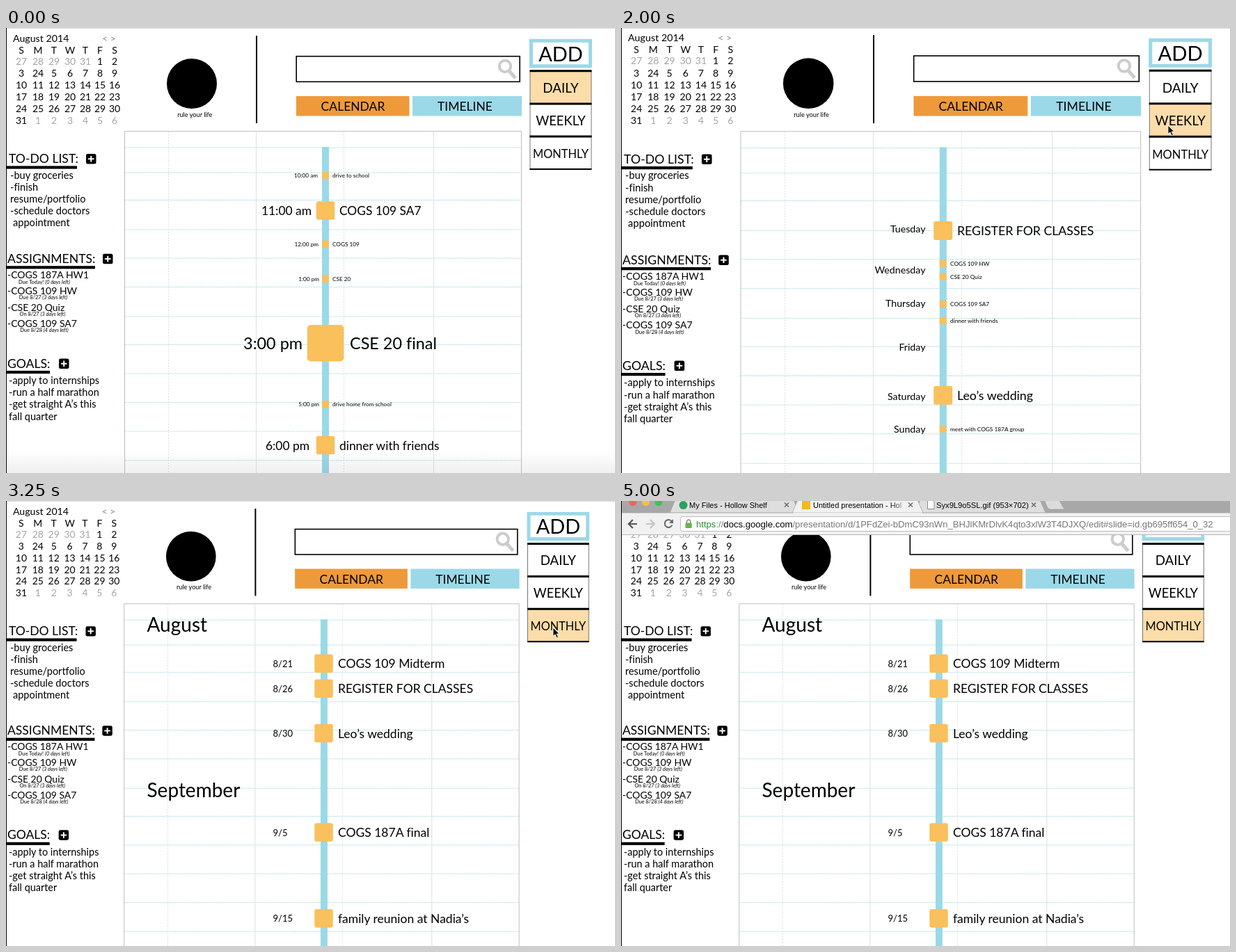
Write an HTML page that moves like this. It is 875 px wide and 640 px high and loops after 5500 ms.

```html
<!DOCTYPE html>
<html lang="en">
<head>
<meta charset="utf-8">
<title>Planner</title>
<style>
  html, body { margin: 0; width: 100%; height: 100%; overflow: hidden; background: #fff; }
  svg { display: block; width: 875px; height: 640px; font-family: Lato, sans-serif; font-variant-ligatures: none; }
  text { white-space: pre; }
  .ui { font-family: "Liberation Sans", Arial, sans-serif; }
  .anim { animation: 5500ms step-end infinite; }
  #daily { animation-name: daily; }
  #weekly { animation-name: weekly; }
  #monthly { animation-name: monthly; }
  #browser { animation-name: browser; }
  #inactive { animation-name: inactive; }
  #shade { animation-name: shade; }
  #cursor { animation-name: cursor; }
  @keyframes daily { 0% { visibility: visible } 36.36%, 100% { visibility: hidden } }
  @keyframes weekly { 0%, 59.09%, 100% { visibility: hidden } 36.36% { visibility: visible } }
  @keyframes monthly { 0% { visibility: hidden } 59.09%, 100% { visibility: visible } }
  @keyframes browser { 0% { visibility: hidden } 81.81%, 100% { visibility: visible } }
  @keyframes inactive { 0%, 90.9%, 100% { visibility: hidden } 81.81% { visibility: visible } }
  @keyframes shade {
    0%, 81.81% { visibility: visible }
    18.18%, 90.9%, 100% { visibility: hidden }
  }
  @keyframes cursor {
    0% { visibility: hidden; transform: translate(808px, 162px) }
    4.54% { visibility: visible; transform: translate(808px, 162px) }
    9.09% { visibility: visible; transform: translate(819px, 163px) }
    13.63% { visibility: visible; transform: translate(806px, 143px) }
    18.18% { visibility: visible; transform: translate(803px, 140px) }
    27.27% { visibility: visible; transform: translate(786px, 140px) }
    45.45% { visibility: visible; transform: translate(786px, 174px) }
    49.99% { visibility: visible; transform: translate(786px, 182px) }
    63.63% { visibility: visible; transform: translate(777px, 164px) }
    68.18% { visibility: visible; transform: translate(778px, 158px) }
    72.72%, 100% { visibility: hidden; transform: translate(778px, 158px) }
  }
</style>
</head>
<body>
<svg id="stage" viewBox="0 0 875 640"></svg>
<script>
const BLUE = '#9bd9e8', GOLD = '#f9c05c', ORANGE = '#ee9a3a', PEACH = '#fcdda9';

const text = (x, y, size, str, anchor = 'start', fill = '#000') =>
  `<text x="${x}" y="${y}" font-size="${size}" text-anchor="${anchor}" fill="${fill}">${str}</text>`;
const rect = (x, y, w, h, fill, extra = '') =>
  `<rect x="${x}" y="${y}" width="${w}" height="${h}" fill="${fill}" ${extra}/>`;
const line = (x1, y1, x2, y2, stroke, w = 1, extra = '') =>
  `<path d="M${x1} ${y1}L${x2} ${y2}" stroke="${stroke}" stroke-width="${w}" fill="none" ${extra}/>`;
const dot = (x, y, size) =>
  rect(x - size / 2, y - size / 2, size, size, GOLD, `rx="${size > 40 ? 5 : size > 20 ? 3 : 0.5}"`);
const lines = (x, y, step, size, rows) =>
  rows.map((row, i) => text(x, y + i * step, size, row)).join('');

function miniCalendar() {
  const cols = [22, 46, 69, 92, 114, 135, 156];
  let out = text(10, 20, 14.2, 'August 2014') + text(148, 20, 14, '&lt; &gt;', 'middle', '#888');
  [...'SMTWTFS'].forEach((d, i) => out += text(cols[i], 37, 14, d, 'middle'));
  for (let i = 0; i < 42; i++) {
    const day = i - 4;
    const other = day < 1 || day > 31;
    // The second row really shows 24 on Monday.
    const label = i === 8 ? 24 : day < 1 ? day + 31 : day > 31 ? day - 31 : day;
    out += text(cols[i % 7], 53 + 17 * Math.floor(i / 7), 14, label, 'middle', other ? '#a5a5a5' : '#000');
  }
  return out;
}

const heading = (x, y, str, width, plusX) =>
  text(x, y, 17.6, str) + rect(0, y + 4.4, width, 4.2, '#000') +
  rect(plusX, y - 13, 14.5, 14.5, '#000', 'rx="2.5"') +
  `<path d="M${plusX + 3} ${y - 5.8}h8.5m-4.25 -4.25v8.5" stroke="#fff" stroke-width="2"/>`;

function sidebar() {
  const tasks = [
    [360, '-COGS 187A HW1', 55, 'Due Today!', 0],
    [382.5, '-COGS 109 HW', 53.5, 'Due 8/27', 3],
    [406.5, '-CSE 20 Quiz', 52.5, 'On 8/27', 3],
    [429.5, '-COGS 109 SA7', 55, 'Due 8/28', 4]
  ];
  return heading(4, 194, 'TO-DO LIST:', 102, 115) +
    lines(6, 216.5, 17.1, 14.6, ['-buy groceries', '-finish', 'resume/portfolio', '-schedule doctors']) +
    text(10, 285, 14.6, 'appointment') +
    heading(2, 337.8, 'ASSIGNMENTS:', 128, 139) +
    tasks.map(([y, name, x, due, days]) => text(2, y, 14, name) +
      text(x, y + 7.5, 7.4, `${due} <tspan font-style="italic">(${days} days left)</tspan>`, 'middle')).join('') +
    heading(2, 488.5, 'GOALS:', 63, 76) +
    lines(4, 512, 17.2, 14.5, ['-apply to internships', '-run a half marathon', '-get straight A’s this', 'fall quarter']);
}

function header() {
  return '<circle cx="267" cy="80" r="36"/>' +
    text(271.3, 127.5, 9.2, 'rule your life', 'middle') +
    line(360, 11, 360, 137, '#000', 2) +
    rect(417.2, 40.7, 321, 36.6, '#fff', 'stroke="#000" stroke-width="1.6"') +
    '<circle cx="717" cy="55" r="8.2" fill="none" stroke="#ccc" stroke-width="4"/>' +
    line(723, 62, 732, 72, '#ccc', 5) +
    rect(417, 98, 162.5, 28.5, ORANGE) + text(498.5, 119.3, 17.5, 'CALENDAR', 'middle') +
    rect(584, 98, 157, 28.5, BLUE) + text(659.5, 119.3, 17.5, 'TIMELINE', 'middle');
}

function grid() {
  const rows = [172, 208, 247.5, 290, 331, 372.5, 415, 455.5, 497, 538.5, 580, 622];
  return rows.map(y => line(171, y, 740, y, '#bfe3ec', 1, 'stroke-dasharray="3 .6"')).join('') +
    [233.5, 485.5].map(x => line(x, 149, x, 645, '#dedede', 1, 'stroke-dasharray="2 2"')).join('') +
    [359.5, 614.5].map(x => line(x, 149, x, 645, '#e0e0e0')).join('') +
    `<path d="M170.5 645V148.5H740.5V645" fill="none" stroke="#bdbdbd"/>` +
    rect(454, 171, 10, 475, BLUE);
}

function modes(active) {
  let out = rect(754.5, 18.3, 85, 36.5, '#fff', `stroke="${BLUE}" stroke-width="5"`) +
    text(797, 47.5, 29, 'ADD', 'middle');
  [['DAILY', 18.8], ['WEEKLY', 18.4], ['MONTHLY', 16.4]].forEach(([name, size], i) => {
    const y = 61.5 + 47.2 * i;
    out += rect(753, y, 88, 47.2, i === active ? PEACH : '#fff', 'stroke="#555" stroke-width=".8"') +
      text(797, y + 31.3, size, name, 'middle');
  });
  for (let i = 0; i < 4; i++) out += line(752.5, 61.8 + 47.1 * i, 841.5, 61.8 + 47.1 * i, '#000', i < 3 ? 3 : 2);
  return out;
}

const view = (id, active, transform, body) =>
  `<g id="${id}" class="anim">${rect(0, 0, 875, 640, '#fff')}<g transform="${transform}">` +
  miniCalendar() + sidebar() + header() + grid() + modes(active) + `</g>${body}</g>`;

// size: 0 small, 1 medium, 2 large
const dayEvents = [
  [212, 0, '10:00 am', 'drive to school', 448],
  [262.5, 1, '11:00 am', 'COGS 109 SA7', 439],
  [310.5, 0, '12:00 pm', 'COGS 109', 449],
  [360.5, 0, '1:00 pm', 'CSE 20', 450],
  [453.3, 2, '3:00 pm', 'CSE 20 final', 426],
  [541, 0, '5:00 pm', 'drive home from school', 450],
  [600, 1, '6:00 pm', 'dinner with friends', 436]
].map(([y, s, time, name, end]) => {
  const font = [8.2, 17.4, 23.4][s], base = y + [3, 6.5, 8.5][s];
  return dot(459, y, [10, 26.5, 52.5][s]) + text(end, base, font, time, 'end') +
    text([469, 479, 494][s], base, font, name);
}).join('');

const weekDays = [[294, 'Tuesday'], [352.5, 'Wednesday'], [401, 'Thursday'],
  [463.5, 'Friday'], [535, 'Saturday'], [582, 'Sunday']]
  .map(([y, name]) => text(437.5, y, 14.2, name, 'end')).join('');
const weekEvents = [
  [291.5, 1, 'REGISTER FOR CLASSES'], [338.5, 0, 'COGS 109 HW'], [357.8, 0, 'CSE 20 Quiz'],
  [397, 0, 'COGS 109 SA7'], [421, 0, 'dinner with friends'], [528.3, 1, 'Leo’s wedding'],
  [576.7, 0, 'meet with COGS 187A group']
].map(([y, big, name]) => dot(462.7, y, big ? 27 : 10) +
  text(big ? 483 : 473, y + (big ? 6.7 : 3), big ? 17.7 : 8.3, name)).join('');

const monthEvents = [
  [233.7, '8/21', 'COGS 109 Midterm'], [269.7, '8/26', 'REGISTER FOR CLASSES'],
  [334, '8/30', 'Leo’s wedding'], [476.5, '9/5', 'COGS 187A final'],
  [600.3, '9/15', 'family reunion at Nadia’s']
].map(([y, date, name]) => dot(456.5, y, 26.5) +
  text(383.5, y + 5, 13, date) + text(477, y + 6.5, 17.5, name)).join('');
const monthTitles = text(202.5, 188, 28, 'August') + text(202.5, 426, 28, 'September');

function browser() {
  const tab = (x, w, fill) =>
    `<path d="M${x} 17L${x + 9} -4H${x + w - 9}L${x + w} 17Z" fill="${fill}" stroke="#a2a2a2" stroke-width=".8"/>`;
  const close = x => `<path d="M${x - 3} 2.5l6 6m0 -6l-6 6" stroke="#666" stroke-width="1.4"/>`;
  const lights = ['#f9605a', '#f8bd45', '#3bc650']
    .map((c, i) => `<circle cx="${17 + 18.5 * i}" cy="1.5" r="5.5" fill="${c}"/>`).join('');
  const arrow = (x, dir, color) =>
    `<path d="M${x + 6 * dir} 33H${x - 6 * dir}m${6 * dir} -6l${-6 * dir} 6l${6 * dir} 6" fill="none" stroke="${color}" stroke-width="2.2"/>`;
  const url = '<tspan fill="#2a8f2f">https</tspan><tspan fill="#777">://</tspan>docs.google.com' +
    '<tspan fill="#777">/presentation/d/1PFdZei-bDmC93nWn_BHJlKMrDlvK4qto3xlW3T4DJXQ/edit#slide=id.gb695ff654_0_32</tspan>';
  return `<g id="browser" class="anim ui">` + rect(0, 0, 875, 18, '#a8a8a8') +
    rect(0, 0, 875, 18, '#d2d2d2', 'id="inactive" class="anim"') + lights +
    tab(70, 186, '#dedede') + tab(422, 188, '#dedede') +
    `<path d="M608 -2H629L637 12H617Q614 12 612 8Z" fill="#dcdcdc" stroke="#a2a2a2" stroke-width=".8"/>` +
    rect(0, 17, 875, 32, '#f1f1f1') + line(0, 17, 875, 17, '#aaa', .8) + tab(246, 188, '#f1f1f1') +
    rect(247, 17, 186, 2, '#f1f1f1') +
    '<circle cx="89.5" cy="6" r="6" fill="#2ba160"/>' + text(98, 9.7, 11, 'My Files - Hollow Shelf') + close(238) +
    rect(260, 0, 12, 12, '#f4b91f') + text(276, 9.7, 11, 'Untitled presentation - Hol', 'start', 'url(#tabFade)') + close(416) +
    '<path d="M440.5 -2h6l3.5 3.5v10h-9.5z" fill="#fff" stroke="#888"/>' +
    text(453, 9.7, 11.2, 'Syx9L9o5SL.gif (953×702)') + close(593) +
    arrow(17, 1, '#555') + arrow(42, -1, '#c4c4c4') +
    '<path d="M73 29.5A5.5 5.5 0 1 0 73.5 34.5" fill="none" stroke="#666" stroke-width="2"/><path d="M75 26v6h-6z" fill="#666"/>' +
    rect(85.5, 22.5, 795, 21, '#fff', 'rx="3" stroke="#bdbdbd"') +
    '<path d="M94.5 32v-2.5a2.6 2.6 0 0 1 5.2 0V32" fill="none" stroke="#8a8a8a" stroke-width="1.5"/>' +
    rect(92.5, 31.5, 9.2, 7.5, '#69b34c', 'rx="1"') + text(108, 37.5, 13.12, url) +
    line(0, 48.5, 875, 48.5, '#b5b5b5') + '</g>';
}

document.getElementById('stage').innerHTML =
  `<defs>
    <linearGradient id="fade" x2="0" y2="1"><stop stop-opacity="0"/><stop offset="1" stop-opacity=".06"/></linearGradient>
    <linearGradient id="tabFade" gradientUnits="userSpaceOnUse" x1="385" x2="408"><stop/><stop offset="1" stop-opacity=".25"/></linearGradient>
  </defs>` +
  view('daily', 0, '', dayEvents) +
  view('weekly', 1, 'translate(0 -1) scale(1.0083)', weekDays + weekEvents) +
  view('monthly', 2, 'scale(.9955)', monthTitles + monthEvents) +
  rect(0, 0, 875, 1, '#ddd') + browser() +
  rect(0, 606, 875, 34, 'url(#fade)', 'id="shade" class="anim"') +
  rect(0, 0, 1, 640, '#000') +
  '<path id="cursor" class="anim" d="M0 0V12.5L3 9.8L5.2 15L7.4 14L5.2 9H9Z" stroke="#fff" stroke-width=".9"/>';
</script>
</body>
</html>
```
